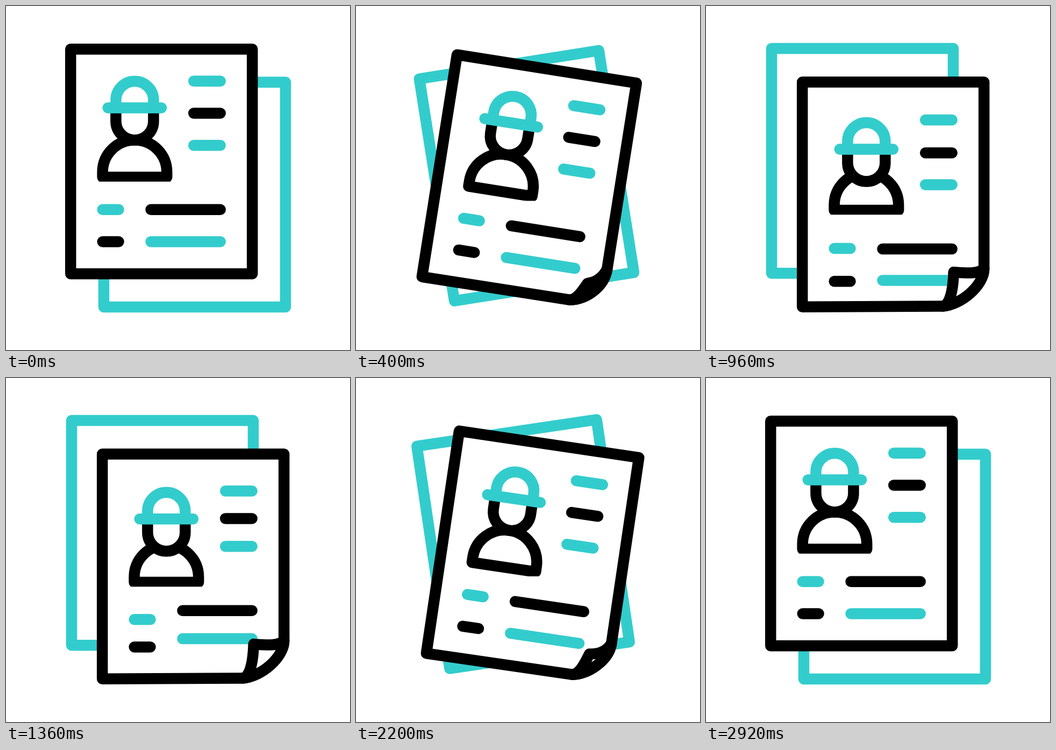
An HTML page with a canvas that plays this animation: 640x640 px, repeating every 3000 ms.

```html
<!DOCTYPE html>
<html>
<head>
<meta charset="utf-8">
<style>
html, body { margin: 0; width: 100%; height: 100%; overflow: hidden; background: #fff; }
canvas { display: block; }
</style>
</head>
<body>
<canvas width="640" height="640"></canvas>
<script>
const ctx = document.querySelector('canvas').getContext('2d');
const TEAL = '#33cccc', BLACK = '#000';
const W = 169, H = 209.1;          // half size of a sheet
const LOOP = 3000, SWAP = 533, SWAP_OUT = 113, SWAP_BACK = 1995;

const clamp = x => Math.min(1, Math.max(0, x));
const ease = x => { x = clamp(x); return x * x * (3 - 2 * x); };
const mix = (a, b, k) => a + (b - a) * k;
const mixAll = (a, b, k) => a.map((v, i) => mix(v, b[i], k));

// Eased value between [time, value] keys
function track(keys, t) {
  let v = keys[0][1];
  for (let i = 1; i < keys.length; i++) {
    const [t0, v0] = keys[i - 1], [t1, v1] = keys[i];
    if (t >= t0) v = mix(v0, v1, ease((t - t0) / (t1 - t0)));
  }
  return v;
}

const BOB = [[660, 0], [926, 12.5], [1193, -22], [1460, 23], [1785, 0]];
const NOD = [[660, 0], [926, 16.5], [1193, 0], [1460, 16.5], [1793, 0]];
const STAGGER = 33.3;

// x1, x2, y, colour, delay steps
const BARS = [
  [60, 109.5, -149.4, TEAL, 0],
  [60, 109.5, -89.8, BLACK, 1],
  [60, 109.5, -30, TEAL, 2],
  [-109.5, -79.7, 89.5, TEAL, 0],
  [-109.5, -79.7, 149.2, BLACK, 1],
  [-19.7, 109.5, 89.5, BLACK, 2],
  [-19.7, 109.5, 149.2, TEAL, 3]
];

// Folded corner: right end, tip and bottom end, with their handles
const FLAT = [W, 145, W, 180, W, 200, W, H, 156, H, 143, H, 130, H];
const FOLDED = [W, 138, 157, 149, 132, 146, 112.5, 144.5, 112, 164, 109, 205, 92, 208];

function place(x, y, angle) {
  const c = Math.cos(angle), s = Math.sin(angle);
  ctx.setTransform(c, s, -s, c, x, y);
}

function draw(color, build, fill) {
  ctx.beginPath();
  build();
  if (fill) { ctx.fillStyle = '#fff'; ctx.fill(); }
  ctx.strokeStyle = color;
  ctx.stroke();
}

const line = (x1, x2, y, color) => draw(color, () => { ctx.moveTo(x1, y); ctx.lineTo(x2, y); });

function person(x, y, angle, nod) {
  // The shoulders are cut level just above their lower edge
  const cut = y + 10 * Math.sin(angle) + 29.3 * Math.cos(angle) + 8.3;
  ctx.save();
  ctx.resetTransform();
  ctx.beginPath();
  ctx.rect(0, 0, 640, cut);
  ctx.clip();
  place(x, y, angle);
  draw(BLACK, () => {
    ctx.moveTo(-109.6, 29.3);
    ctx.arc(-49.8, 19.8, 59.8, Math.PI, 0);
    ctx.lineTo(10, 29.3);
    ctx.closePath();
  }, true);
  ctx.restore();

  ctx.lineCap = 'butt';
  draw(BLACK, () => {
    ctx.moveTo(-14.8, -99.7 + nod);
    ctx.arc(-49.8, -74.8 + nod, 35, 0, Math.PI);
    ctx.lineTo(-84.8, -99.7 + nod);
  }, true);
  draw(TEAL, () => {
    ctx.moveTo(-84.8, -99.7 + nod);
    ctx.arc(-49.8, -114.3 + nod, 35, Math.PI, 0);
    ctx.lineTo(-14.8, -99.7 + nod);
  }, true);
  ctx.lineCap = 'round';
  line(-99.5, -0.2, -99.7 + nod, TEAL);
}

function frontSheet(x, y, angle, curl, t) {
  const f = mixAll(FLAT, FOLDED, curl);
  const bend = 1 - (1 - curl) ** 2;
  const [ax, ay, bx, by] = mixAll([W, H, W, H], [W, 169, 127, 205], bend);
  const folded = curl > 0;

  place(x, y, angle);
  draw(BLACK, () => {
    ctx.moveTo(f[12], f[13]);
    ctx.lineTo(-W, H);
    ctx.lineTo(-W, -H);
    ctx.lineTo(W, -H);
    ctx.lineTo(f[0], f[1]);
    if (folded) ctx.bezierCurveTo(ax, ay, bx, by, f[12], f[13]);
    else ctx.lineTo(W, H);
    ctx.closePath();
  }, true);

  for (const [x1, x2, by0, color, step] of BARS)
    line(x1, x2, by0 + track(BOB, t - step * STAGGER), color);
  person(x, y, angle, track(NOD, t));

  if (folded) draw(BLACK, () => {
    ctx.moveTo(f[0], f[1]);
    ctx.bezierCurveTo(...f.slice(2, 8));
    ctx.bezierCurveTo(...f.slice(8));
    ctx.bezierCurveTo(bx, by, ax, ay, f[0], f[1]);
    ctx.closePath();
  }, true);
}

function render(t) {
  const s = t < 1900 ? clamp((t - SWAP_OUT) / SWAP) : clamp((t - SWAP_BACK) / SWAP);
  const p = t < 1900 ? ease(s) : 1 - ease(s);
  const angle = 9.33 * Math.PI / 180 * ease(s < 0.48 ? s / 0.48 : (1 - s) / 0.52);

  ctx.resetTransform();
  ctx.fillStyle = '#fff';
  ctx.fillRect(0, 0, 640, 640);
  ctx.lineWidth = 20.5;
  ctx.lineJoin = ctx.lineCap = 'round';

  place(mix(351, 291, p), mix(350.8, 288.2, p), -angle);
  draw(TEAL, () => ctx.rect(-W, -H, 2 * W, 2 * H), true);
  frontSheet(mix(289.25, 348.2, p), mix(289.25, 350.6, p), angle, p, t);
}

function tick() {
  render(performance.now() % LOOP);
  requestAnimationFrame(tick);
}
tick();
</script>
</body>
</html>
```
